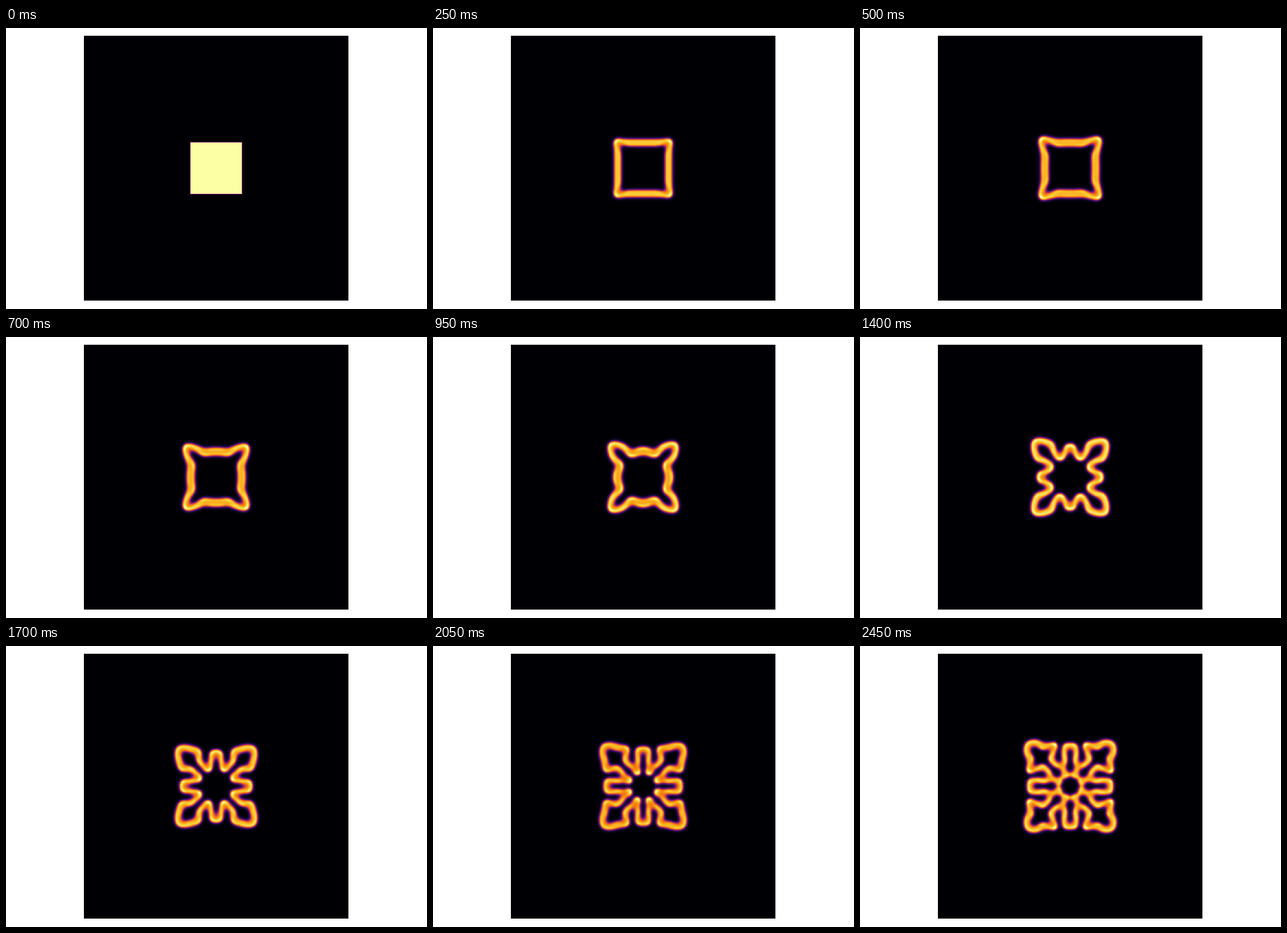
These frames come from a looping animation (600x400 px, 2500 ms). An HTML page with a canvas:

```html
<!DOCTYPE html>
<html lang="en">
<head>
<meta charset="utf-8">
<title>Reaction diffusion</title>
<style>
  html, body { margin: 0; width: 100%; height: 100%; overflow: hidden; background: #fff; }
  canvas { display: block; }
</style>
</head>
<body>
<canvas id="stage" width="600" height="400"></canvas>
<script>
// Gray-Scott model on one quadrant; the full field mirrors it about both axes.
const GRID = 256, HALF = 96, SEED = 25;
const DU = 0.16, DV = 0.08, FEED = 0.06, KILL = 0.062;
const FRAMES = 50, STEPS = 50, FRAME_MS = 50;
const LEFT = 111, TOP = 11, SIZE = 377;
const STOPS = ['000004', '210c4a', '57106e', '8a226a', 'bc3754', 'e45a31', 'f98e09', 'f9cb35', 'fcffa4']
  .map(hex => [0, 2, 4].map(i => parseInt(hex.slice(i, i + 2), 16)));

const palette = Array.from({ length: 256 }, (_, i) => {
  const t = i / 255 * (STOPS.length - 1), n = Math.min(Math.floor(t), STOPS.length - 2);
  return STOPS[n].map((c, j) => c + (STOPS[n + 1][j] - c) * (t - n));
});

function simulate() {
  let u = new Float64Array(HALF * HALF).fill(1), v = new Float64Array(HALF * HALF);
  let nextU = u.slice(), nextV = v.slice();
  for (let y = 0; y < SEED; y++)
    for (let x = 0; x < SEED; x++) {
      u[y * HALF + x] = 0.5;
      v[y * HALF + x] = 0.5;
    }

  function step() {
    for (let y = 0; y < HALF; y++)
      for (let x = 0; x < HALF; x++) {
        const i = y * HALF + x;
        const l = x ? i - 1 : i, r = x < HALF - 1 ? i + 1 : i;
        const t = y ? i - HALF : i, b = y < HALF - 1 ? i + HALF : i;
        const a = u[i], c = v[i], reaction = a * c * c;
        nextU[i] = a + DU * (u[l] + u[r] + u[t] + u[b] - 4 * a) - reaction + FEED * (1 - a);
        nextV[i] = c + DV * (v[l] + v[r] + v[t] + v[b] - 4 * c) + reaction - (FEED + KILL) * c;
      }
    [u, nextU] = [nextU, u];
    [v, nextV] = [nextV, v];
  }

  return Array.from({ length: FRAMES }, (_, n) => {
    if (n) for (let s = 0; s < STEPS; s++) step();
    return v.slice();
  });
}

// For each pixel along an axis: the two nearest cells and a raised-cosine blend.
const samples = Array.from({ length: SIZE }, (_, p) => {
  const g = Math.max(0, Math.abs(p + 0.5 - SIZE / 2) * GRID / SIZE - 0.5);
  const cell = Math.floor(g);
  return {
    a: Math.min(cell, HALF - 1),
    b: Math.min(cell + 1, HALF - 1),
    w: (1 - Math.cos(Math.PI * (g - cell))) / 2
  };
});

const ctx = document.getElementById('stage').getContext('2d');
const image = ctx.createImageData(SIZE, SIZE);
const fields = simulate();

function draw(field) {
  const peak = field.reduce((m, c) => Math.max(m, c), 1e-9);
  let p = 0;
  for (const y of samples) {
    const top = y.a * HALF, bottom = y.b * HALF;
    for (const x of samples) {
      const upper = field[top + x.a] * (1 - x.w) + field[top + x.b] * x.w;
      const lower = field[bottom + x.a] * (1 - x.w) + field[bottom + x.b] * x.w;
      const level = (upper * (1 - y.w) + lower * y.w) / peak;
      const rgb = palette[Math.min(255, Math.floor(level * 256))];
      image.data[p++] = rgb[0];
      image.data[p++] = rgb[1];
      image.data[p++] = rgb[2];
      image.data[p++] = 255;
    }
  }
  ctx.putImageData(image, LEFT, TOP);
}

let shown = -1;
const start = performance.now();
function tick() {
  const n = Math.floor((performance.now() - start) / FRAME_MS) % FRAMES;
  if (n !== shown) draw(fields[shown = n]);
  requestAnimationFrame(tick);
}
tick();
</script>
</body>
</html>
```
